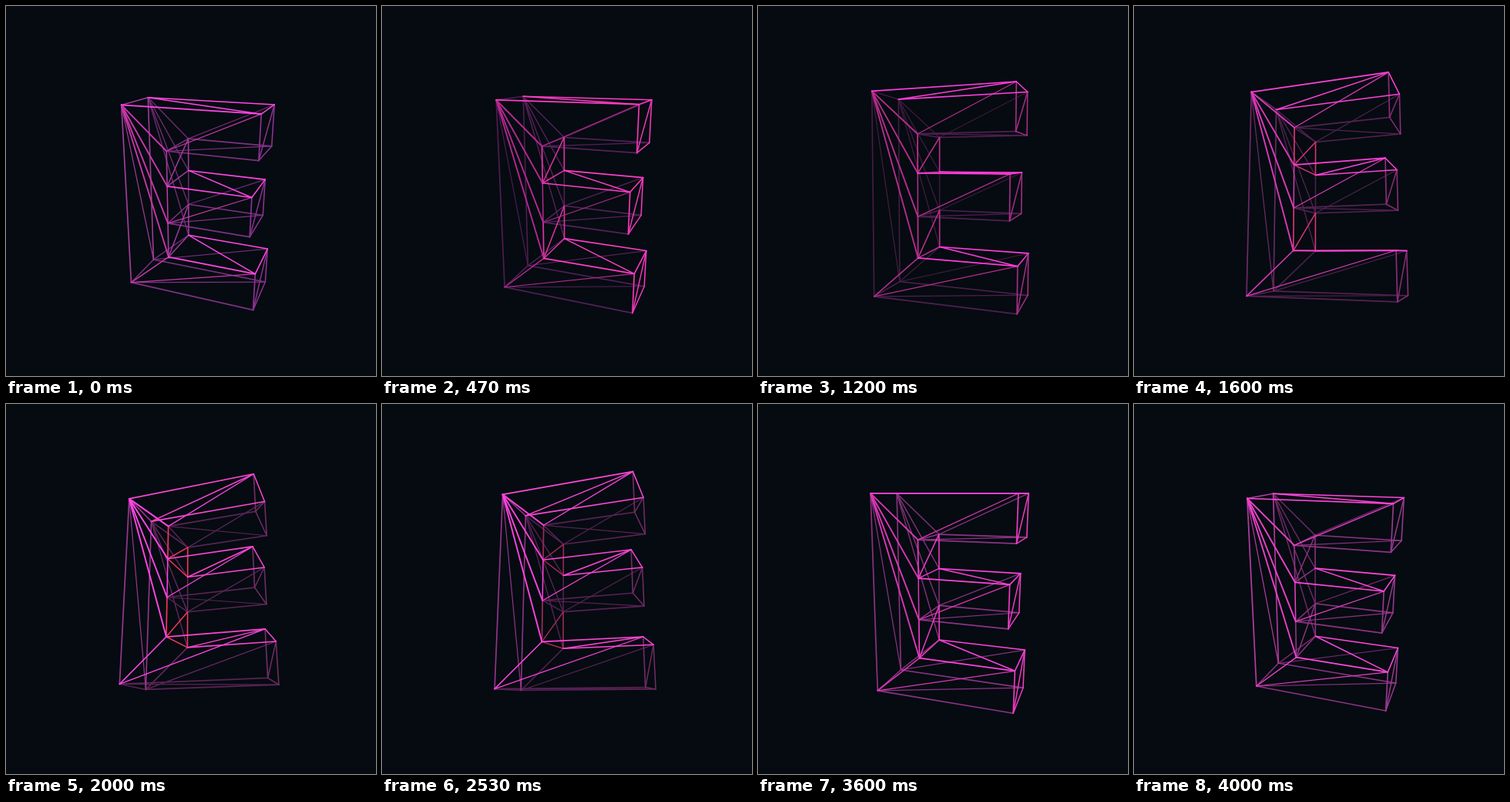
Write an HTML page with a canvas that moves like this. It is 480 px wide and 480 px high and loops after 4070 ms.

```html
<!DOCTYPE html>
<html>
<head>
<meta charset="utf-8">
<style>
  html, body { margin: 0; height: 100%; overflow: hidden; background: #050b11; }
  canvas { display: block; }
</style>
</head>
<body>
<canvas id="stage" width="480" height="480"></canvas>
<script>
const ctx = document.getElementById('stage').getContext('2d');
const LOOP = 4070, STEP = 200 / 3, FOCAL = 558, HALF_DEPTH = 0.1425;

// Outline of the letter, clockwise from the top left; height is 1.
const L = -0.35, I = -0.1128, R1 = 0.343, R2 = 0.32, R3 = 0.357;
const Y = [-0.5, -0.291, -0.11, 0.093, 0.289, 0.5];
const outline = [
  [L, Y[0]], [R1, Y[0]], [R1, Y[1]], [I, Y[1]], [I, Y[2]], [R2, Y[2]],
  [R2, Y[3]], [I, Y[3]], [I, Y[4]], [R3, Y[4]], [R3, Y[5]], [L, Y[5]]
];
const N = outline.length;

// Faces: Back, Under, Left, Right, Inner, Front, Top, in paint order.
const FACES = 'BULRIFT';
const SIDES = 'TRUITRUITRUL';

// Edges join vertex numbers; 0-11 lie in front, 12-23 behind.
const edges = [];
const addEdge = (face, a, b, width) => edges.push({ face: FACES.indexOf(face), a, b, width });
for (const [face, base] of [['B', N], ['F', 0]]) {
  for (const k of [3, 4, 7, 8]) addEdge(face, base, base + k, face === 'F' ? 1.9 : 1.4);
  for (const [a, b] of [[4, 7], [8, 11]]) addEdge(face, base + a, base + b, 1.5);
  for (const [a, b] of [[1, 3], [5, 7], [9, 11]]) addEdge(face, base + a, base + b, 1.2);
}
for (let i = 0; i < N; i++) {
  const j = (i + 1) % N, side = SIDES[i];
  addEdge(side, i, j, 1.7);
  addEdge(side, i + N, j + N, 1.6);
  addEdge(side, i + N, j, side === 'U' || side === 'L' ? 1.2 : 1.5);
  addEdge(SIDES[(i + N - 1) % N], i, i + N, 1.5);
}
edges.sort((p, q) => p.face - q.face);

// time, pitch, yaw (degrees), distance
const poses = [
  [0, 20, 21.6, 2.276], [470, 16.1, 21.3, 2.21], [1200, 3.75, 20.4, 2.1],
  [1600, -8.2, 20.2, 2.101], [2000, -18.5, 20.1, 2.217], [2184, -19.7, 20, 2.232],
  [2670, -11.7, 19.6, 2.129], [3000, -1.7, 19.4, 2.083], [3600, 12.6, 19.4, 2.142],
  [4000, 17.3, 19.5, 2.2], [4070, 17.9, 19.5, 2.208]
];

// Face colours in the order of FACES.
const lights = [
  [0, '6e2a70 7d3080 a03c96 8c3290 a03a9a c837aa ff46e6'],
  [470, '5a2058 55205a 501c50 f038b8 e035a5 b42890 ff3cc8'],
  [1200, '3c1a3c 4f1f4f 461c42 a52d87 c0308f b42d8c ff3cdc'],
  [2000, '64285f 5a2355 96378c 6e2d64 f0375f ff46e6 fa46d2'],
  [3000, '4b1c46 55204f 8c3282 6e2a64 55204f ff41d7 ff46dc'],
  [3600, '823278 8c3285 8c3282 eb3cc3 eb3cc3 dc37b4 ff41dc'],
  [4000, '73296c 8c3282 b43ca0 963a8c 8c3282 eb41c8 ff46dc']
].map(([t, list]) => [t, list.split(' ').map(hex =>
  [0, 2, 4].map(k => parseInt(hex.slice(k, k + 2), 16)))]);

// Index of the key that opens the span around t.
function spanAt(keys, t) {
  let i = 0;
  while (i < keys.length - 2 && keys[i + 1][0] <= t) i++;
  return i;
}

function slope(i, k) {
  const a = poses[Math.max(i - 1, 0)], b = poses[Math.min(i + 1, poses.length - 1)];
  return (b[k] - a[k]) / (b[0] - a[0]);
}

// Cubic Hermite through the poses.
function poseAt(t, k) {
  const i = spanAt(poses, t), a = poses[i], b = poses[i + 1];
  const d = b[0] - a[0], u = (t - a[0]) / d, v = 1 - u;
  return a[k] * v * v * (1 + 2 * u) + b[k] * u * u * (3 - 2 * u)
    + d * u * v * (slope(i, k) * v - slope(i + 1, k) * u);
}

function coloursAt(t) {
  const i = spanAt(lights, t), [t0, a] = lights[i], [t1, b] = lights[i + 1];
  const u = Math.min((t - t0) / (t1 - t0), 1);
  return a.map((c, f) => `rgb(${c.map((v, k) => Math.round(v + (b[f][k] - v) * u))})`);
}

function project(t) {
  const pitch = poseAt(t, 1) * Math.PI / 180, yaw = poseAt(t, 2) * Math.PI / 180;
  const distance = poseAt(t, 3);
  const sp = Math.sin(pitch), cp = Math.cos(pitch), sy = Math.sin(yaw), cy = Math.cos(yaw);
  return [HALF_DEPTH, -HALF_DEPTH].flatMap(z => outline.map(([x, y]) => {
    const z1 = x * sy + z * cy;
    const scale = FOCAL / (distance - z1 * cp + y * sp);
    return [
      240.4 + scale * (x * cy - z * sy + 0.0365),
      240.3 + scale * (y * cp + (z1 + 0.1) * sp + 0.013)
    ];
  }));
}

function draw(t) {
  const points = project(t), colours = coloursAt(t);
  ctx.fillStyle = '#050b11';
  ctx.fillRect(0, 0, 480, 480);
  ctx.lineCap = 'round';
  for (const { face, a, b, width } of edges) {
    ctx.strokeStyle = colours[face];
    ctx.lineWidth = width;
    ctx.beginPath();
    ctx.moveTo(...points[a]);
    ctx.lineTo(...points[b]);
    ctx.stroke();
  }
}

// The picture advances 15 times a second, on times rounded to 10 ms.
const tick = n => Math.round(n * STEP / 10) * 10;
function stepped(t) {
  let n = Math.ceil(t / STEP) + 1;
  while (tick(n) > t) n--;
  return tick(n);
}

const start = performance.now();
function frame() {
  draw(stepped((performance.now() - start) % LOOP));
  requestAnimationFrame(frame);
}
frame();
</script>
</body>
</html>
```
